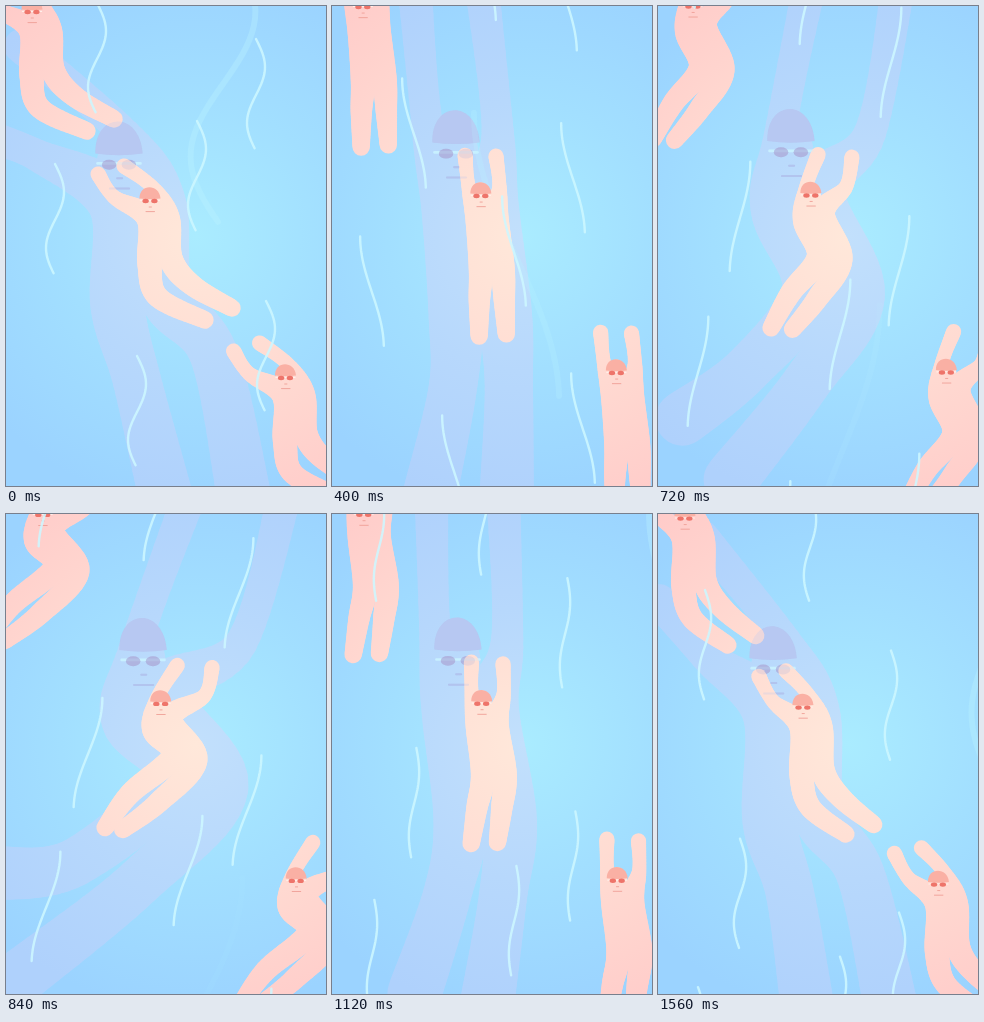
Recreate the animation shown at these times as an HTML page with a canvas. Size 320 by 480 pixels, loop 1.6 s.

```html
<!DOCTYPE html>
<html lang="en">
<head>
<meta charset="utf-8">
<title>Swimmers</title>
<style>
html, body { margin: 0; width: 100%; height: 100%; overflow: hidden; background: #9bd3ff; }
canvas { display: block; width: 320px; height: 480px; }
</style>
</head>
<body>
<canvas id="stage" width="320" height="480"></canvas>
<script>
const ctx = document.getElementById('stage').getContext('2d');
const LOOP = 1600, STEP = 40, TURN = 825, RETURN = 1035;

// Joints of the stroke: bent back, straight, bent forward.
const POSE = {
  handL:  [[92, 168], [134, 149], [173, 152]],
  elbowL: [[108, 191], [137, 180], [151, 186]],
  handR:  [[118, 160], [165, 150], [208, 154]],
  elbowR: [[147, 182], [168, 180], [200, 182]],
  chest:  [[152, 212], [155, 212], [156, 210]],
  hip:    [[154, 255], [160, 262], [180, 242]],
  kneeL:  [[152, 291], [147, 295], [123, 278]],
  kneeR:  [[186, 279], [172, 295], [152, 287]],
  footL:  [[199, 314], [146, 330], [97, 312]],
  footR:  [[226, 302], [173, 328], [114, 314]],
  face:   [[144, 195], [149, 190], [155, 190]]
};
// The large pale swimmer stretches further, in stage pixels.
const REACH = {
  handL: [[-20, 130], [85, -20], [190, -20]],
  handR: [[15, 40], [153, -20], [285, -20]],
  footL: [[160, 492], [95, 490], [-20, 350]],
  footR: [[238, 490], [172, 490], [5, 460]]
};
const BIG = { s: 2.25, x: -211, y: -280 };
const SMALL = [[-118, -189], [0, 0], [135.5, 177]];

// Water lines and light rays: x, y, speed.
const LINES = [
  [91, -3, 1.04], [250, 33, 1.16], [191, 115, 1.04], [49, 158, 1], [260, 295, 1],
  [131, 350, .82], [242, -125, .83], [161, -117, .3], [56, -280, 1.13]
];
const RAYS = [[217, -67, 2.4], [368, -775, 2.4]];

function radial(r, ...colors) {
  const g = ctx.createRadialGradient(190, 230, 0, 190, 230, r);
  colors.forEach((c, i) => g.addColorStop(i / (colors.length - 1), c));
  return g;
}
const WATER = radial(270, '#aaecff', '#a2dfff', '#9bd3ff');
const SKIN = radial(300, '#ffe8da', '#ffdbd2', '#ffcbc9');
const PALE = radial(270, '#c2e0fc', '#b7d8fc', '#afd1fc');
const SMALL_FACE = { cap: '#fab0a4', lens: '#ee746a', strap: '#fff0ea', line: '#f0a097', base: -2.5, top: -14 };
const BIG_FACE = { cap: '#b6c8f1', lens: '#afb5e0', strap: '#c8f0ff', line: '#b2c4ee', base: -5, top: -20.5 };

// Bend from -1 (back) to 1 (forward): lingers midway going out, eases out coming back.
function bendAt(t) {
  if (t > TURN) return 1 - 2 * Math.sin((t - TURN) / RETURN * Math.PI / 2);
  const s = 2 * t / TURN - 1;
  return .75 * s + .25 * s ** 3;
}

// Every joint runs on a parabola through its three places.
function poseAt(joints, b) {
  const out = {};
  for (const k in joints) {
    const [back, mid, fore] = joints[k];
    out[k] = mid.map((m, i) => m + b * (fore[i] - back[i]) / 2 + b * b * ((back[i] + fore[i]) / 2 - m));
  }
  return out;
}

function spline(a, b, c, d, u) {
  return .5 * (2 * b + (c - a) * u + (2 * a - 5 * b + 4 * c - d) * u * u
    + (3 * b - a - 3 * c + d) * u * u * u);
}

function sample(pts, per) {
  const out = [], n = pts.length - 1;
  for (let i = 0; i < n; i++) {
    const a = pts[Math.max(i - 1, 0)], b = pts[i], c = pts[i + 1], d = pts[Math.min(i + 2, n)];
    for (let j = 0; j < per; j++) out.push(b.map((v, k) => spline(a[k], v, c[k], d[k], j / per)));
  }
  out.push(pts[n]);
  return out;
}

// Point at a distance to the side of a, seen along the line from a to b.
function beside(a, b, dist, c) {
  const dx = b[0] - a[0], dy = b[1] - a[1], l = Math.hypot(dx, dy);
  return [c[0] + dy / l * dist, c[1] - dx / l * dist];
}

// One side of the body from hand to foot, each point with its radius.
function side(p, key, toe) {
  const sign = key === 'L' ? -1 : 1;
  const knees = [(p.kneeL[0] + p.kneeR[0]) / 2, (p.kneeL[1] + p.kneeR[1]) / 2];
  const shoulder = beside(p.chest, p.hip, 10 * sign, p.chest);
  const hip = beside(p.chest, knees, 11 * sign, p.hip);
  return [
    [...p['hand' + key], 7.6], [...p['elbow' + key], 7], [...shoulder, 11.5],
    [...hip, 12], [...p['knee' + key], 10.7], [...p['foot' + key], toe]
  ];
}

function ellipse(x, y, rx, ry) {
  ctx.beginPath();
  ctx.ellipse(x, y, rx, ry, 0, 0, 7);
  ctx.fill();
}

function body(p, s, ox, oy, fill, toe) {
  ctx.strokeStyle = ctx.fillStyle = fill;
  ctx.lineCap = 'round';
  for (const key of 'LR') {
    const pts = sample(side(p, key, toe), 12);
    for (let i = 1; i < pts.length; i++) {
      const [x0, y0] = pts[i - 1], [x1, y1, r] = pts[i];
      ctx.lineWidth = 2 * r * s;
      ctx.beginPath();
      ctx.moveTo(x0 * s + ox, y0 * s + oy);
      ctx.lineTo(x1 * s + ox, y1 * s + oy);
      ctx.stroke();
    }
  }
  ellipse(p.face[0] * s + ox, p.face[1] * s + oy, 10 * s, 13.5 * s);
}

function face(p, s, ox, oy, c) {
  ctx.save();
  ctx.translate(p.face[0] * s + ox, p.face[1] * s + oy);
  ctx.scale(s, s);
  ctx.fillStyle = c.cap;
  ctx.beginPath();
  ctx.moveTo(-10.5, c.base);
  ctx.bezierCurveTo(-11, c.top - 3, 9, c.top - 4, 10.5, c.base);
  ctx.quadraticCurveTo(0, c.base + 1.5, -10.5, c.base);
  ctx.fill();
  ctx.strokeStyle = c.strap;
  ctx.lineWidth = 1.2;
  ctx.beginPath();
  ctx.moveTo(-9.5, -.6);
  ctx.lineTo(9.5, -.6);
  ctx.stroke();
  ctx.fillStyle = c.lens;
  ellipse(-4.4, 0, 3.2, 2.2);
  ellipse(4.4, 0, 3.2, 2.2);
  ctx.strokeStyle = c.line;
  ctx.lineWidth = .9;
  ctx.beginPath();
  ctx.moveTo(-.8, 6);
  ctx.lineTo(1.4, 6);
  ctx.moveTo(-4, 10.6);
  ctx.lineTo(4.5, 10.6);
  ctx.stroke();
  ctx.restore();
}

// Lines sink, lean right then left once, and curl into an S at both ends of the loop.
function waterLine([x, y, speed], t, len, amp) {
  const lean = t < 1150 ? 29 * Math.sin(2 * Math.PI * t / 1150) : 0;
  const curl = 9 * Math.max(0, Math.cos(2 * Math.PI * t / 1380));
  const drift = -9 * Math.min(1, t / 300);
  const top = y + speed * (.202 * t - .35 * lean);
  ctx.beginPath();
  for (let q = 0; q <= 1; q += .025) {
    const sway = lean * (.5 - .5 * Math.cos(Math.PI * q) - .5) + curl * Math.sin(2 * Math.PI * q);
    ctx.lineTo(x + amp * (drift + sway), top + len * q);
  }
  ctx.stroke();
  return top;
}

function draw(t) {
  const b = bendAt(t);
  const p = poseAt(POSE, b), far = poseAt(REACH, b);
  for (const k in far) far[k] = [(far[k][0] - BIG.x) / BIG.s, (far[k][1] - BIG.y) / BIG.s];
  const big = { ...p, ...far };

  ctx.fillStyle = WATER;
  ctx.fillRect(0, 0, 320, 480);
  body(big, BIG.s, BIG.x, BIG.y, PALE, 12);
  face(big, BIG.s, BIG.x, BIG.y, BIG_FACE);

  ctx.lineCap = ctx.lineJoin = 'round';
  ctx.lineWidth = 6;
  for (const ray of RAYS) {
    const depth = Math.max(0, ray[1] + ray[2] * .202 * t);
    ctx.strokeStyle = `rgba(185,240,255,${Math.max(0, .36 * (1 - depth / 380))})`;
    waterLine(ray, t, 290, 3.6);
  }

  for (const [x, y] of SMALL) {
    body(p, 1, x, y, SKIN, 8.7);
    face(p, 1, x, y, SMALL_FACE);
  }
  // Pale goggles still show faintly through the hands.
  ctx.globalAlpha = .25;
  face(big, BIG.s, BIG.x, BIG.y, BIG_FACE);
  ctx.globalAlpha = 1;

  ctx.strokeStyle = 'rgba(205,248,255,.88)';
  ctx.lineWidth = 2.4;
  LINES.forEach(l => waterLine(l, t, 112, 1));
}

const start = performance.now();
function tick() {
  const t = (performance.now() - start) % LOOP;
  draw(Math.floor(t / STEP) * STEP);
  requestAnimationFrame(tick);
}
tick();
</script>
</body>
</html>
```
